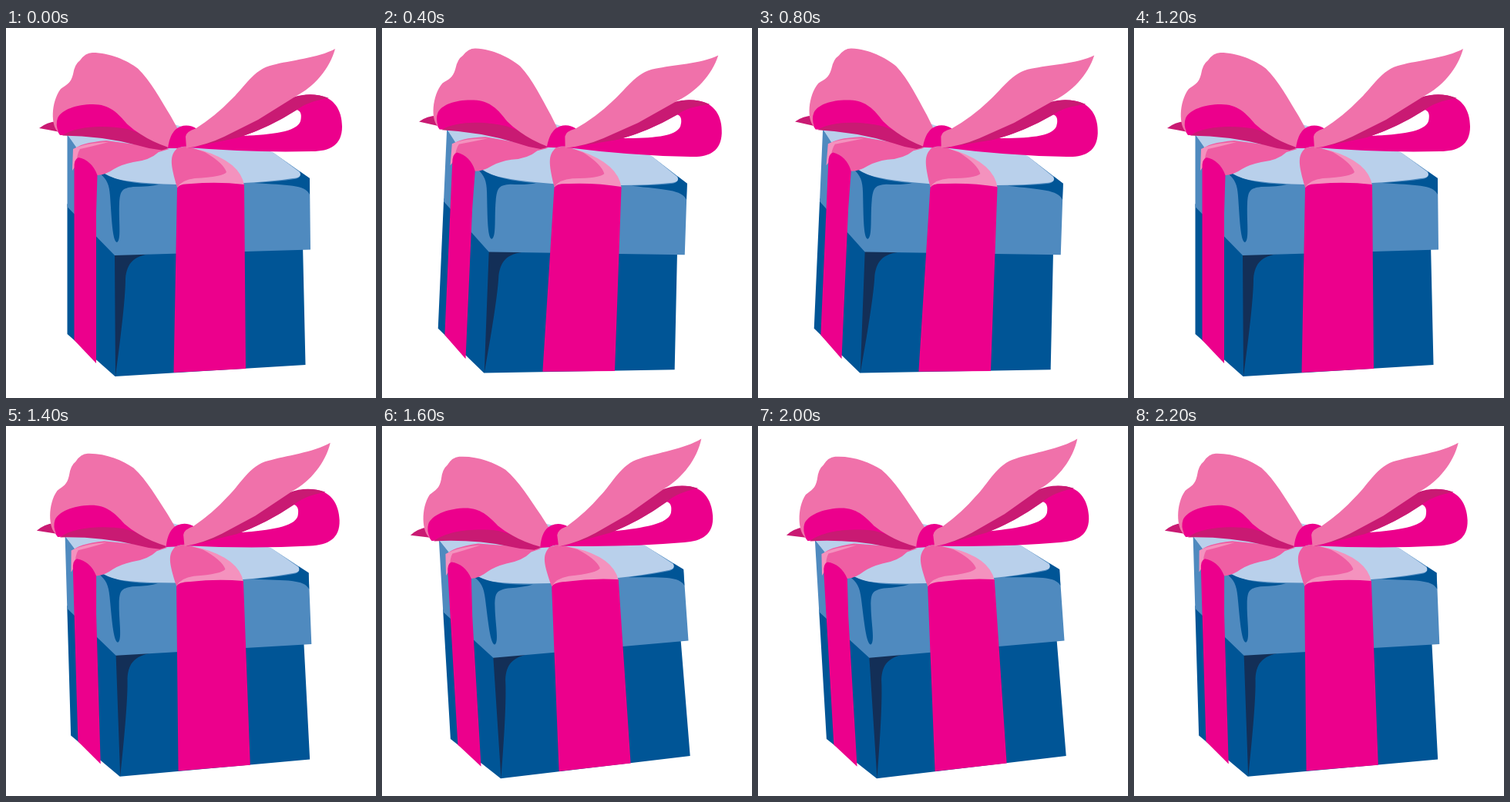
These frames come from a looping animation (480x480 px, 2400 ms). An HTML page:

```html
<!DOCTYPE html>
<html lang="en">
<head>
<meta charset="utf-8">
<title>Swinging gift</title>
<style>
html, body { margin: 0; width: 100%; height: 100%; overflow: hidden; background: #fff; }
svg { display: block; width: 100vw; height: 100vh; }
.navy { fill: #132f57; }
.deep { fill: #005596; }
.lid { fill: #4f8abf; }
.sky { fill: #b9d0eb; }
.hot { fill: #ec008c; }
.wine { fill: #c91a73; }
.rose { fill: #f071aa; }
.pink { fill: #ef5ea3; }
.pale { fill: #f492be; }
</style>
</head>
<body>
<svg viewBox="0 0 480 480">
<g id="gift">
  <!-- box -->
  <path class="deep" d="M79.500 228V397L141.500 452L388.500 437L385 280L141 285Z"/>
  <path class="navy" d="M141 294L196 292C165 294 157 305 155 325C155 350 149 400 142 452Z"/>
  <!-- lid -->
  <path class="lid" d="M79.500 138V232L141 295L395 287.500L394 195L347 162L118 188Z"/>
  <path class="sky" d="M79.500 138L200 120L346 161L381 187Q385 194 372 195Q345 199 309 201L222 203Q150 201 128 191L92 156Z"/>
  <path class="deep" d="M121 188C131 196 134 203 135 218C137 246 138 277 144 278C150 275 146 250 147 228C148 211 150 208 165 206Q187 206 198 203Q150 202 128 189Z"/>
  <path class="deep" d="M322 201Q355 199 374 196Q385 194 381 186L394 195V216C388 203 365 204 322 201Z"/>
  <!-- wrapped ribbon -->
  <path class="pink" d="M212 157L130 146Q95 149 88 158L88 180L119 191Q130 190 140 183Q150 177 165 174Q186 172 198 161Z"/>
  <path class="pale" d="M86 185L87 157Q103 149 133 148Q110 154 96 157Q92 163 91 178Z"/>
  <path class="hot" d="M88.500 182Q88 170 94 168C105 170 114 178 118.500 191L117 240V435L88.500 405Z"/>
  <path class="pale" d="M232 154L255 159Q304 174 309 204L237 206L222 207Z"/>
  <path class="pink" d="M222 156C212 166 213 176 222 207Q228 197 245 195Q282 193 286 187Q282 175 258 161L234 153Z"/>
  <path class="hot" d="M222 208Q224 202 240 202Q275 199 309 203L311 442L217.500 447Z"/>
  <!-- left bow -->
  <path class="wine" d="M43 130Q53 122 66 121L70 135Q55 132 43 130Z"/>
  <path class="hot" d="M70 139C58 122 68 106 83 101Q118 90 139 104L212 156L150 140Q98 126 75 139Z"/>
  <path class="wine" d="M73 139.500C92 126 130 126 157 131Q182 138 211 156L202 158.500Q186 157 170 152Q125 140 73 139.500Z"/>
  <path class="rose" d="M68 135C58 128 58 96 71 79C79 73 84 72 87 60Q89 47 96 42Q103 32 112 32C135 32 157 42 171 52.500C188 69 200 92 213.500 114L224 133L211 155Q190 148 175 138Q165 132 157 124.500C145 110 134 99 113 99C91 99 72 106 67 117Q64 125 68 135Z"/>
  <!-- knot and right bow -->
  <path class="hot" d="M210 156Q213 133 226 128Q237 124 248 131L245 154Q232 152 222 156Z"/>
  <path class="hot" fill-rule="evenodd" d="M236 155Q315 132 372 92Q385 85 403 87C425 89 436 106 436 128C436 152 420 160 397 160Q320 162 236 155ZM308 140C345 138 377 135 382 121Q385 108 377 106Q345 127 308 140Z"/>
  <path class="wine" d="M235 156Q315 125 372 90Q396 82 419 91Q391 95 377 106.500Q340 130 302 142Z"/>
  <path class="rose" d="M427 27C405 39 368 42 346 48C321 53 308 79 291 94Q273 113 246 130.500Q234 134 233 141L234 156Q260 152 283 141L327 119L376 88.500C400 76 420 53 427 27Z"/>
</g>
</svg>
<script>
const gift = document.getElementById('gift');
const STEP = 200, STEPS = 12, LEFT = 5, RIGHT = 3.8;

// Triangle wave in held steps, tilting slightly further to the left.
function draw(now) {
  const i = Math.floor(now / STEP) % STEPS;
  const swing = 1 - Math.abs((i + 3) % STEPS - 6) / 3;
  const angle = swing * (swing > 0 ? RIGHT : LEFT);
  gift.setAttribute('transform', `rotate(${angle} 240 240)`);
}

const start = performance.now();
function loop() {
  draw(performance.now() - start);
  requestAnimationFrame(loop);
}
loop();
</script>
</body>
</html>
```
